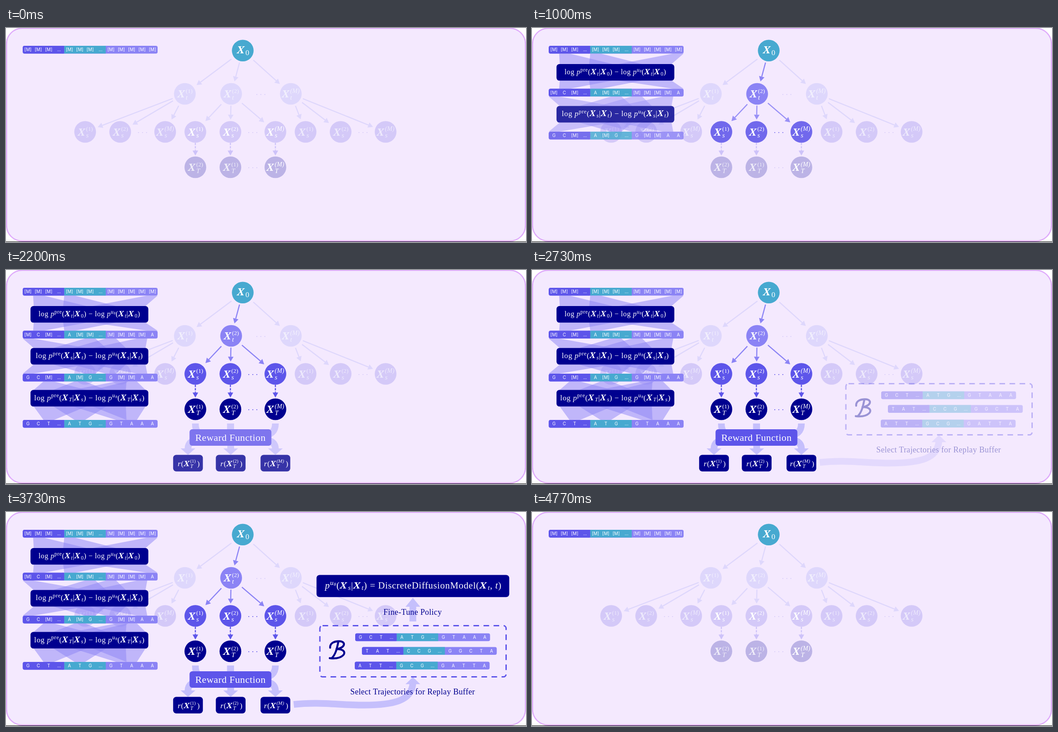
An HTML page that plays this animation: 1163x481 px, repeating every 4800 ms.

```html
<!DOCTYPE html>
<html lang="en">
<head>
<meta charset="utf-8">
<title>Tree search fine-tuning</title>
<style>
  html, body { margin: 0; width: 100%; height: 100%; overflow: hidden; background: #fff; }
  svg { display: block; width: 100%; height: 100%; }
  text { font-family: "Liberation Serif", "Noto Serif", serif; white-space: pre; }
  .it { font-style: italic; }
  .vec { font-family: "Noto Serif", "Liberation Serif", serif; font-weight: bold; font-style: italic; }
  .formula { text-anchor: middle; letter-spacing: .035em; fill: #fff; }
  .formula .vec { letter-spacing: .16em; }
  .cell { font-family: Inter, Roboto, sans-serif; font-size: 9.8px; text-anchor: middle; fill: #fff; }
</style>
</head>
<body>
<svg id="stage" viewBox="0 0 1163 481" preserveAspectRatio="none"></svg>
<script>
const LOOP = 4800, FADE = 300, FIRST = 180, STEP = 606, OUT = 4455;

const C = {
  teal: '#47a9d0', blue: '#5d55ea', violet: '#8b83f5', navy: '#00008f', pale: '#c5bffc',
  t0: '#ded7fc', s0: '#d4c9f8', T0: '#bcb3e6', dash0: '#cdc2f9'
};
const SUPS = ['(1)', '(2)', '(M)'];
const stage = document.getElementById('stage');

function el(parent, tag, attrs = {}, text) {
  const e = document.createElementNS('http://www.w3.org/2000/svg', tag);
  for (const k in attrs) e.setAttribute(k, attrs[k]);
  if (text !== undefined) e.textContent = text;
  return parent.appendChild(e);
}
const group = (g, attrs) => el(g, 'g', attrs);
const box = (g, x, y, width, height, rx, fill) => el(g, 'rect', { x, y, width, height, rx, fill });
const disc = (g, { x, y }, r, fill) => el(g, 'circle', { cx: x, cy: y, r, fill });
const put = (g, x, y, size, cls, s) => el(g, 'text', { x, y, 'font-size': size, class: cls }, s);
const line = (g, x, y, size, fill, s) =>
  el(g, 'text', { x, y, 'font-size': size, fill, 'text-anchor': 'middle', 'letter-spacing': .36 }, s);
const poly = (g, pts, fill) => el(g, 'polygon', { points: pts.join(' '), fill });

function arrow(g, x1, y1, x2, y2, color, dash) {
  const a = Math.atan2(y2 - y1, x2 - x1), c = Math.cos(a), s = Math.sin(a);
  const len = 11, half = 6.2, bx = x2 - c * len, by = y2 - s * len;
  el(g, 'line', {
    x1, y1, x2: bx, y2: by, stroke: color, 'stroke-width': 2.4, 'stroke-dasharray': dash || 'none'
  });
  poly(g, [bx - s * half, by + c * half, x2, y2, bx + s * half, by - c * half], color);
}

// Joins two nodes, leaving a wider gap on diagonals.
function link(g, a, b, color) {
  const t = Math.atan2(b.y - a.y, b.x - a.x), c = Math.cos(t), s = Math.sin(t);
  const d = 26.5 + 5.5 * Math.sin(2 * t) ** 2, e = d + 1.2;
  arrow(g, a.x + c * d, a.y + s * d, b.x - c * e, b.y - s * e, color);
}
const drop = (g, a, color) => arrow(g, a.x, 258, a.x, 286.5, color, '5 2.6');

function dots(g, x, y, fill) {
  for (const d of [-9, 0, 9]) disc(g, { x: x + d, y }, 1.1, fill);
}

// Bold X with stacked superscript and subscript
function vec(g, x, y, size, sub, top) {
  const right = x + size * .86, wide = top === '(M)';
  put(g, x, y, size, 'vec', 'X');
  put(g, right, y + size * .21, size * .7, 'it', sub);
  put(g, right, y - size * .48, size * (wide ? .66 : .615), wide ? 'it' : '', top);
}

function node(g, p, fill, sub, top, opacity = 1) {
  disc(g, p, 24.3, fill);
  const t = group(g, { fill: '#fff', opacity });
  vec(t, p.x - (top === '(M)' ? 20 : 16.5), p.y + 8, 21.5, sub, top);
}

const CELL = 23.2;
function row(g, x, y, cells) {
  const w = CELL * 13, r = 4, h = 17.4;
  box(g, x, y, w, h, r, C.violet);
  box(g, x, y, CELL * 4, h, r, C.blue);
  box(g, x + CELL * 4 - r, y, r, h, 0, C.blue);
  box(g, x + CELL * 4, y, CELL * 4, h, 0, C.teal);
  cells.split(' ').forEach((s, i) => {
    const label = s === 'M' ? '[M]' : s === '.' ? '...' : s;
    el(g, 'text', { x: x + CELL * (i + .5), y: y + 12.3, class: 'cell' }, label);
  });
}

// Centred formula: ^ raises, _ lowers, * is a script of a script, ~ is a space.
const SHIFT = { '^': [-.38, .74], '_': [.16, .74], '*': [-.27, .5] };
function math(g, x, y, size, src) {
  const t = el(g, 'text', { x, y, 'font-size': size, class: 'formula' });
  let level = 0;
  for (const k of src.split(' ')) {
    const [up, scale] = SHIFT[k[0]] || [0, 1], s = SHIFT[k[0]] ? k.slice(1) : k;
    const cls = s === 'X' ? 'vec' : /^[a-zθT]$/.test(s) ? 'it' : '';
    el(t, 'tspan', { dy: (up - level) * size, 'font-size': size * scale, class: cls }, s.replace('~', '\u00a0'));
    level = up;
  }
}

// Bands between a formula box and the cells it fills in
function bands(g, yRow, yBox, cols) {
  const b = group(g, { 'fill-opacity': .5 }), left = 62, span = 250, w = 118;
  cols.forEach((c, i) => {
    const x = 37.5 + c * CELL, u = left + i * (span - w) / (cols.length - 1);
    poly(b, [x, yRow, x + CELL, yRow, u + w, yBox, u, yBox], C.violet);
  });
}

const flow = (g, d) => el(g, 'path', { d, fill: 'none', stroke: C.pale, 'stroke-width': 15 });
const upHead = (g, x, y, h) => poly(g, [x - 16.5, y + h, x + 16.5, y + h, x, y], C.pale);

// Permanent layer
box(stage, 0, 480, 1163, 1, 0, '#000');
el(stage, 'rect', {
  x: 1.2, y: .6, width: 1160.6, height: 478.2, rx: 35,
  fill: '#f4e9fe', stroke: '#dfabfb', 'stroke-width': 2.6
});
const base = group(stage);
const top0 = { x: 529.5, y: 50.8 };
const parents = [400, 503.5, 637].map(x => ({ x, y: 148 }));
const families = [177, 423.5, 670].map(x => [0, 78.4, 179].map(d => ({ x: x + d, y: 233.5 })));
const kids = families[1], ends = kids.map(p => ({ x: p.x, y: 313 }));

parents.forEach((p, i) => {
  link(base, top0, p, C.t0);
  families[i].forEach(k => link(base, p, k, C.t0));
  dots(base, families[i][1].x + 50, 235, C.s0);
});
kids.forEach(k => drop(base, k, C.dash0));
dots(base, 570, 149.5, C.s0);
dots(base, 552, 314, C.s0);
parents.forEach((p, i) => {
  node(base, p, C.t0, 't', SUPS[i], .6);
  families[i].forEach((k, j) => node(base, k, C.s0, 's', SUPS[j], i === 1 ? 1 : .6));
});
ends.forEach((p, i) => node(base, p, C.T0, 'T', ['(2)', '(1)', '(M)'][i], i === 2 ? 1 : .75));
disc(base, top0, 24.3, C.teal);
const root = group(base, { fill: '#fff' });
put(root, 516.5, 57, 22, 'vec', 'X');
put(root, 535.5, 60.5, 17, '', '0');

const ROWS = [
  'M M M . M M M . M M M M M',
  'M C M . A M M . M M M M A',
  'G C M . A M G . G M M A A',
  'G C T . A T G . G T A A A'
];
const ROW_Y = [40, 136.5, 233, 337];
row(base, 37.5, ROW_Y[0], ROWS[0]);

// Stages that fade in one after another
const overlay = group(stage);
const stages = Array.from({ length: 7 }, () => group(overlay));
const [g1, g2, g3, g4, g5, g6, g7] = stages;

[['t', '0'], ['s', 't'], ['T', 's']].forEach(([a, b], i) => {
  const g = stages[i], y = 81 + i * 94.25, h = 37.3;
  const before = ROWS[i].split(' '), after = ROWS[i + 1].split(' ');
  const filled = [...after.keys()].filter(k => after[k] !== before[k]);
  bands(g, ROW_Y[i] + 17.4, y, filled);
  bands(g, ROW_Y[i + 1], y + h, filled);
  box(g, 54.8, y, 263.5, h, 6.5, C.navy);
  const q = `( X _${a} | X _${b} )`;
  math(g, 186.5, y + 23, i ? 17.2 : 16.1, `log~ p ^pre ${q} ~−~ log~ p ^u *θ ${q}`.replace('~−~', '\u00a0−\u00a0'));
  row(g, 37.5, ROW_Y[i + 1], ROWS[i + 1]);
});

link(g1, top0, parents[1], C.violet);
node(g1, parents[1], C.violet, 't', '(2)');
dots(g2, 552, 235, C.blue);
dots(g3, 552, 314, C.blue);
kids.forEach((k, i) => {
  link(g2, parents[1], k, C.violet);
  node(g2, k, C.blue, 's', SUPS[i]);
  drop(g3, k, C.blue);
  node(g3, ends[i], C.navy, 'T', SUPS[i]);
});

const rewards = [407, 502.5, 602.5], mid = rewards[1];
rewards.forEach((x, i) => {
  const from = ends[i].x, wide = i === 2 ? 2.5 : 0;
  flow(g4, `M${from} 345Q${from} 372 ${from + (mid - from) * .3} 372`);
  flow(g4, `M${x + (mid - x) * .35} 380Q${x} 380 ${x} 402`);
  upHead(g4, x, 415.5, -14.5);
  box(g4, x - 33.2, 415.5, 66.5, 37.3, 7, C.navy);
  const t = group(g4, { fill: '#fff' });
  put(t, x - 23 - wide, 441, 17.5, 'it', 'r');
  put(t, x - 15.5 - wide, 441, 17, '', '(');
  vec(t, x - 9.5 - wide, 441, 17, 'T', SUPS[i]);
  put(t, x + 20.5 + wide, 441, 17, '', ')');
});
flow(g4, `M${mid} 345V402`);
box(g4, 410.5, 358, 183, 37, 6, C.blue);
line(g4, 502, 383.5, 22, '#fff', 'Reward Function');

flow(g5, 'M643.5 432.5C700 426 745 434 800 434C868 434 907 424 910 385');
upHead(g5, 910, 371, 16);
el(g5, 'rect', {
  x: 702, y: 255.5, width: 416.5, height: 115, rx: 6, fill: 'none',
  stroke: C.blue, 'stroke-width': 3, 'stroke-dasharray': '12.5 10'
});
el(g5, 'path', {
  d: 'M743 293C740 308 737 320 729 328M725 305C724 294 736 290 746 290.5C761 291 759 306 739 308' +
     'C758 308 759 317 754 322C747 329 737 330 724 328.5',
  fill: 'none', stroke: C.navy, 'stroke-width': 4.4, 'stroke-linecap': 'round', 'stroke-linejoin': 'round'
});
row(g5, 781, 272.8, ROWS[3]);
row(g5, 796, 303.5, 'T A T . C C G . G G C T A');
row(g5, 780, 336.5, 'A T T . G C G . G A T T A');
line(g5, 909.5, 410, 18, C.navy, 'Select Trajectories for Replay Buffer');

flow(g6, 'M910 246V212');
upHead(g6, 910, 193, 20);
box(g6, 694.5, 141.5, 431, 49.8, 7, C.navy);
math(g6, 911, 172, 20.8, 'p ^u *θ ( X _s | X _t ) ~ = ~ DiscreteDiffusionModel ( X _t , ~ t )');
line(g6, 909.5, 231, 18, C.navy, 'Fine-Tune Policy');

flow(g7, 'M910.5 133.5C908 66 850 47 750 47C690 47 640 49.5 568 49');
poly(g7, [569, 34, 569, 64, 553.5, 49], C.pale);
line(g7, 910, 96, 18, C.navy, 'Tree-Search with Updated Policy');

// Motion
const origin = performance.now();
function fade(target, start, from, to) {
  target.animate([
    { offset: 0, opacity: from },
    { offset: start / LOOP, opacity: from, easing: 'ease-in-out' },
    { offset: (start + FADE) / LOOP, opacity: to },
    { offset: 1, opacity: to }
  ], { duration: LOOP, iterations: Infinity }).startTime = origin;
}
stages.forEach((g, i) => fade(g, FIRST + i * STEP, 0, 1));
fade(overlay, OUT, 1, 0);
</script>
</body>
</html>
```
